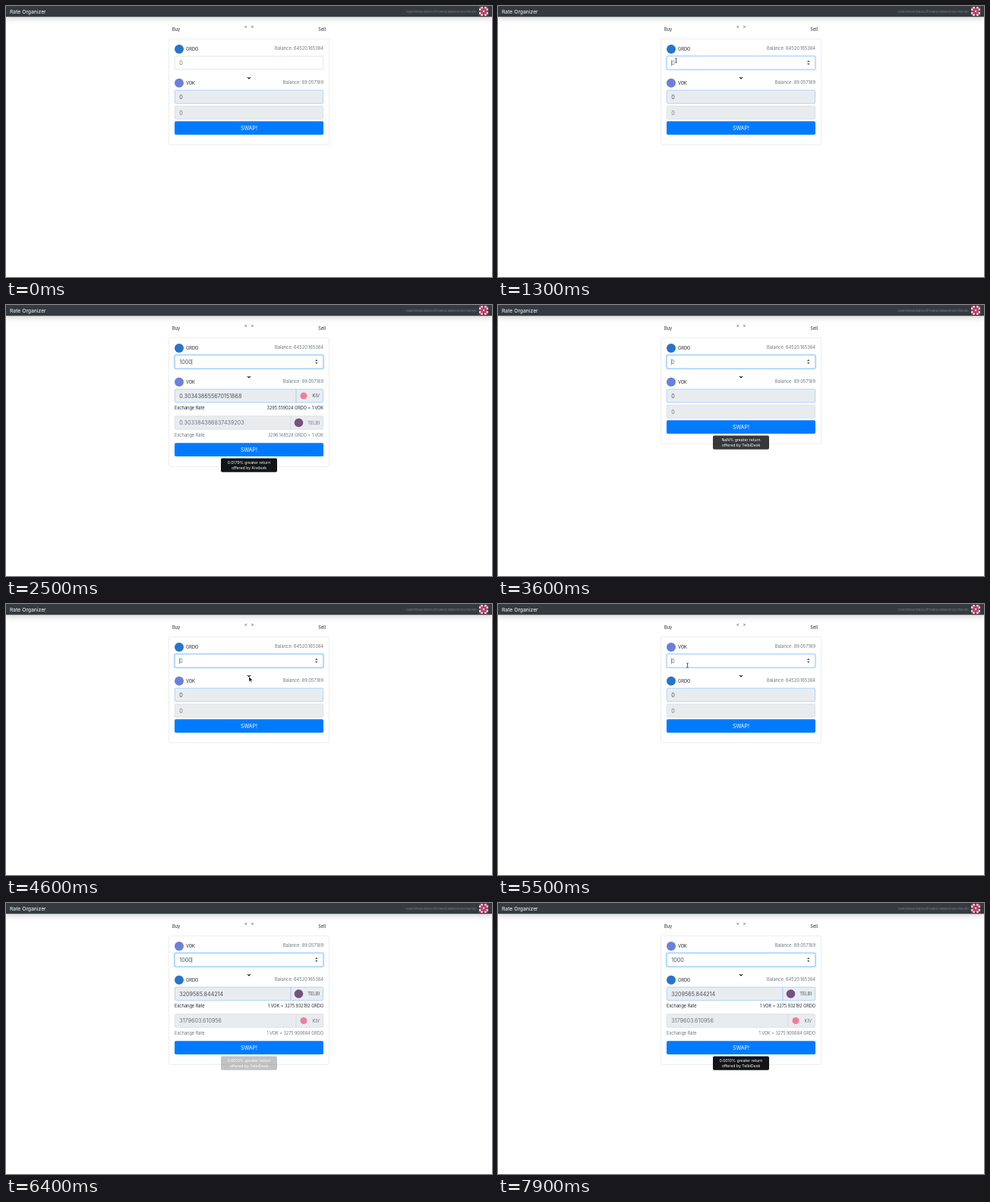
These frames come from a looping animation (640 by 358 pixels, 8 s). An HTML page:

```html
<!DOCTYPE html>
<html lang="en">
<head>
<meta charset="utf-8">
<title>Rate Organizer</title>
<style>
html, body { margin: 0; width: 100%; height: 100%; overflow: hidden; background: #fff; }
svg { display: block; width: 100%; height: 100%; font-family: Inter, Roboto, sans-serif; }
.nav { filter: drop-shadow(0 3.5px 3.5px rgba(0, 0, 0, .15)); }
</style>
</head>
<body>
<svg id="stage" viewBox="0 0 640 358"></svg>
<script>
const LOOP = 8000, BLINK = 500;
const DARK = '#212529', BODY = '#495057', MUTED = '#6c757d';
const LINE = '#ced4da', BLUE = '#80bdff', GREY = '#e9ecef';

const coins = {
  a: { name: 'GRDO', color: '#2775ca', balance: '64520.165384' },
  b: { name: 'VOK', color: '#6b7fdc', balance: '89.057189' }
};
const venues = {
  k: { name: 'KIV', market: 'Kivdesk', color: '#ee7f9c', left: 382, icon: 392, r: 4.5 },
  t: { name: 'TELBI', market: 'TelbiDesk', color: '#75517f', left: 375, icon: 385.5, r: 5.8 }
};
// Best offer first; "full" is the return for 1000.
const offers = {
  a: [{ venue: venues.k, full: '0.303438655670151868', rate: 3295.559024 },
      { venue: venues.t, full: '0.303384386837439203', rate: 3296.148528 }],
  b: [{ venue: venues.t, full: '3209565.844214' },
      { venue: venues.k, full: '3179603.610956' }]
};
const SPOT = 3276;

// [time, field content]
const typed = [[0, ''], [1620, '1'], [1820, '10'], [2010, '100'], [2200, '1000'],
  [2900, '100'], [3070, '10'], [3240, '1'], [3480, ''],
  [5700, '1'], [5920, '10'], [6130, '100'], [6360, '1000']];
// [time, x, y]
const trips = [
  [[700, 17, 60], [1120, 234.5, 72], [1620, 234.5, 72]],
  [[4000, 234.5, 72], [4200, 165, 84], [4600, 320, 96], [4900, 320, 96],
   [5330, 249.5, 81], [5700, 249.5, 81]]
];
const FOCUS = [1200, 5400], BLUR = 4680, FLIP = 4750;

const clamp = v => Math.max(0, Math.min(1, v));
const ease = u => u * u * (3 - 2 * u);

const text = (x, y, s, size = 5.7, fill = DARK, anchor = 'start') =>
  `<text x="${x}" y="${y}" font-size="${size}" fill="${fill}" text-anchor="${anchor}">${s}</text>`;
const box = (x, y, w, h, fill, stroke = 'none', r = 1.8) =>
  `<rect x="${x}" y="${y}" width="${w}" height="${h}" rx="${r}" fill="${fill}" stroke="${stroke}" stroke-width=".6"/>`;
const disc = (x, y, r, fill) => `<circle cx="${x}" cy="${y}" r="${r}" fill="${fill}"/>`;
const path = (d, stroke, w, fill = 'none') =>
  `<path d="${d}" stroke="${stroke}" stroke-width="${w}" fill="${fill}"/>`;

function avatar() {
  const rows = ['101', '011', '110', '011', '101'];
  let s = box(623, 1, 12, 12, '#f6e9ee', 'none', 0);
  rows.forEach((row, j) => {
    for (let i = 0; i < 5; i++)
      if (row[Math.min(i, 4 - i)] === '1')
        s += box(623 + i * 2.4, 1 + j * 2.4, 2.4, 2.4, '#a62b55', 'none', 0);
  });
  return s;
}

const header = '<rect class="nav" width="640" height="14.3" fill="#343a40"/>' +
  text(5, 9.6, 'Rate Organizer', 6.8, '#fff') +
  text(620, 8.7, '0x4B7e19A6c83D502f7E9a14C6d8B35F0e27A9c61D', 3.75, '#7b8288', 'end') +
  avatar() + text(219, 32.6, 'Buy') + text(421, 32.6, 'Sell', 5.7, DARK, 'end') +
  text(316, 30.2, '&lt;', 5.7, DARK, 'middle') + text(324.3, 30.2, '&gt;', 5.7, DARK, 'middle');

function coinRow(coin, y) {
  return disc(228, y, 6, coin.color) + text(237, y + 1.9, coin.name) +
    text(418, y + 1, 'Balance: ' + coin.balance, 5.75, MUTED, 'end');
}

function quote(side, offer, amount) {
  const full = +offer.full;
  const depth = 1000 * full / (SPOT * 1000 - full);
  const rate = side === 'a' ? offer.rate : SPOT * depth * 1000 / (depth * 1000 + amount);
  const value = side === 'a' ? full * amount / 1000 : rate * amount;
  const out = amount === 1000 ? offer.full : value.toFixed(side === 'a' ? 18 : 6);
  const { a, b } = coins;
  const label = side === 'a'
    ? `${rate.toFixed(6)} ${a.name} = 1 ${b.name}`
    : `1 ${b.name} = ${rate.toFixed(6)} ${a.name}`;
  return { value, out, label, venue: offer.venue };
}

function result(q, y, best) {
  const ink = best ? BODY : MUTED, edge = best ? BLUE : LINE;
  let s = box(222.3, y, 195.4, 17.5, GREY, edge) + text(228.3, y + 11.4, q ? q.out : 0, 7.15, ink);
  if (!q) return s;
  const v = q.venue, tone = best ? DARK : MUTED;
  return s + path(`M${v.left} ${y}v17.5`, edge, .6) + disc(v.icon, y + 8.8, v.r, v.color) +
    text(413, y + 10.9, v.name, 5.8, ink, 'end') +
    text(222, y + 27.1, 'Exchange Rate', 5.65, tone) +
    text(418, y + 27.1, q.label, 5.5, tone, 'end');
}

function tooltip(y, percent, market, alpha) {
  return `<g opacity="${alpha}">` + box(283, y, 74, 18.4, '#121416') +
    text(320, y + 7.1, `${percent}% greater return`, 5.2, '#fff', 'middle') +
    text(320, y + 14.9, 'offered by ' + market, 5.2, '#fff', 'middle') + '</g>';
}

function pointer(t) {
  const trip = trips.find(p => t >= p[0][0] && t < p.at(-1)[0]);
  if (!trip) return '';
  const i = trip.findIndex(k => k[0] > t), [t0, x0, y0] = trip[i - 1], [t1, x1, y1] = trip[i];
  const u = ease((t - t0) / (t1 - t0)), x = x0 + (x1 - x0) * u, y = y0 + (y1 - y0) * u;
  const shape = x > 222 && x < 418 && y > 66 && y < 84
    ? path('M-1.3 -3Q0 -3 0 -2Q0 -3 1.3 -3M0 -2V2M-1.3 3Q0 3 0 2Q0 3 1.3 3', '#222', .7)
    : path('M0 0V6.5L1.5 5.1L2.6 7.5L3.6 7L2.5 4.7H4.6Z', '#fff', .4, '#000');
  return `<g transform="translate(${x} ${y})">${shape}</g>`;
}

function render(t) {
  const [keyTime, value] = typed.findLast(k => t >= k[0]);
  const amount = +value;
  const side = t < FLIP ? 'a' : 'b', other = side === 'a' ? 'b' : 'a';
  const focusTime = FOCUS.findLast(f => t >= f) ?? Infinity;
  const focused = t >= focusTime && !(t >= BLUR && t < FOCUS[1]);
  const glow = focused ? clamp((t - focusTime) / 150) : 0;
  const quotes = amount ? offers[side].map(o => quote(side, o, amount)) : [];
  const drop = amount ? 30 : 0, buttonY = 152.3 + drop;

  let s = header + box(214.5, 43.4, 211, 140 + drop, '#fff', '#e2e3e4', 2);
  s += coinRow(coins[side], 57) + coinRow(coins[other], 101.8);

  if (glow) s += `<g opacity="${glow * .25}">` + box(220.8, 64.9, 198.4, 20.3, '#007bff', 'none', 3) + '</g>';
  s += box(222.3, 66.3, 195.4, 17.5, '#fff', focused ? BLUE : LINE);
  s += `<g id="field">${text(228.3, 77.7, value || 0, 7.15, value ? BODY : MUTED)}</g>`;
  if (focused) s += path('M407 74l1.8 -2.3l1.8 2.3zM407 75.8l1.8 2.3l1.8 -2.3z', 'none', 0, '#555');

  s += path('M318.1 94.1l1.9 1.9l1.9 -1.9', '#111', 1.1);
  s += result(quotes[0], 111.2, true) + result(quotes[1], amount ? 146.7 : 132.1, false);
  s += box(222, buttonY, 196, 17.7, '#007bff') + text(320, buttonY + 11.4, 'SWAP!', 6.9, '#fff', 'middle');

  const alpha = t < 3000 ? clamp((t - 2200) / 160)
    : t < 5000 ? 1 - clamp((t - 3573) / 180) : clamp((t - 6360) / 160);
  if (alpha) {
    const percent = amount ? ((quotes[0].value / quotes[1].value - 1) * 100).toFixed(4) : 'NaN';
    s += tooltip(buttonY + 20.1, percent, amount ? quotes[0].venue.market : venues.t.market, alpha);
  }
  stage.innerHTML = s + pointer(t);

  const since = t - (focusTime > keyTime ? focusTime : keyTime);
  if (focused && Math.floor(since / BLINK) % 2 === 0) {
    const width = value ? stage.querySelector('#field text').getComputedTextLength() : 0;
    stage.querySelector('#field').innerHTML += path(`M${228.4 + width} 71.3v8`, '#333', .5);
  }
}

const stage = document.getElementById('stage');
const start = performance.now();
function tick(now) {
  render(Math.max(0, now - start) % LOOP);
  requestAnimationFrame(tick);
}
tick(start);
</script>
</body>
</html>
```
